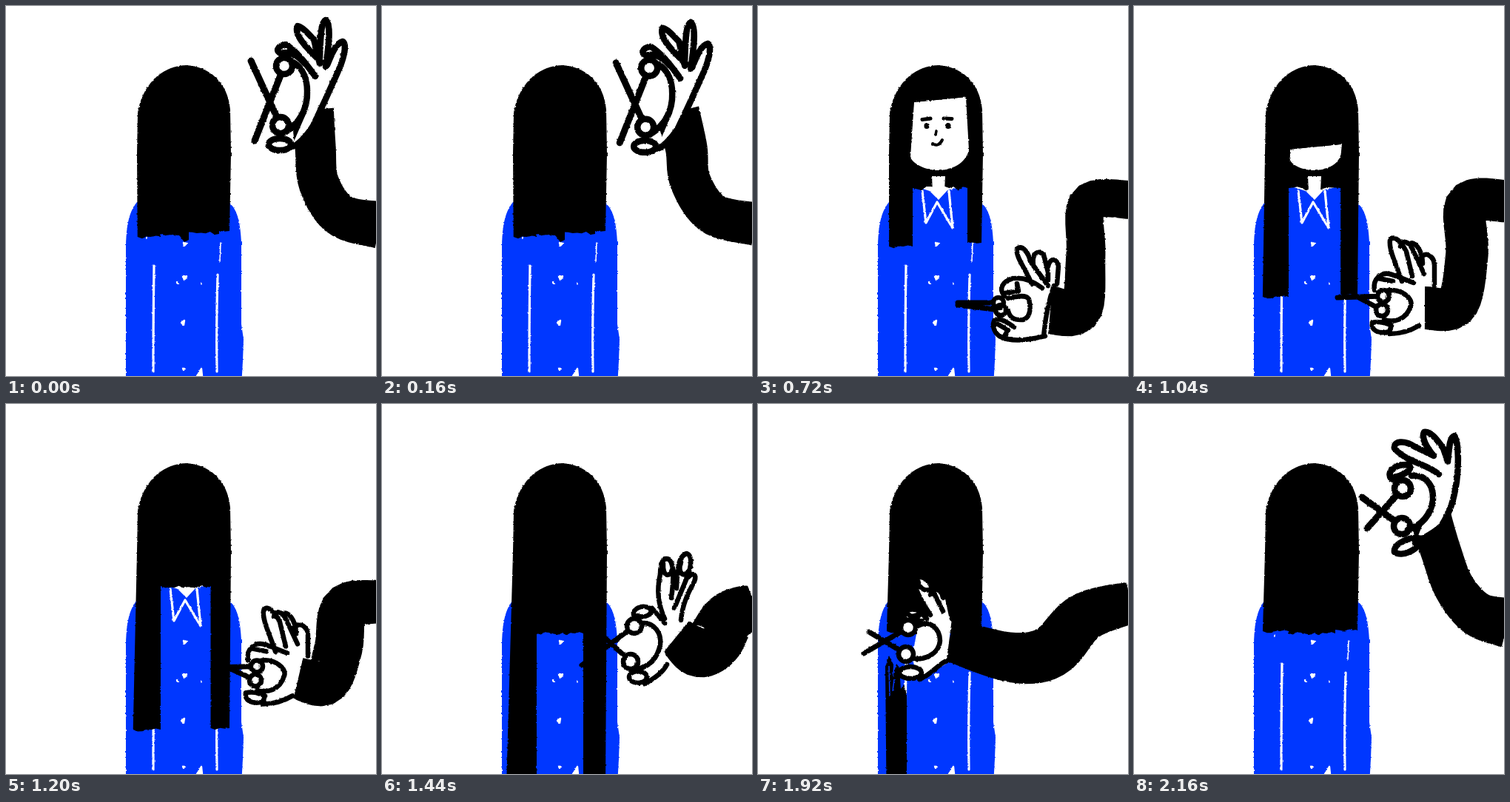
An HTML page for the animation above (2.24 s loop, 500 px wide and 500 px high).

```html
<!DOCTYPE html>
<html lang="en">
<head>
<meta charset="utf-8">
<title>Haircut</title>
<style>
html, body { margin: 0; width: 100%; height: 100%; overflow: hidden; background: #fff; }
svg { display: block; width: 100vw; height: 100vh; }
.pen { stroke-linecap: round; stroke-linejoin: round; }
</style>
</head>
<body>
<svg viewBox="0 0 500 500">
  <defs>
    <filter id="rough" filterUnits="userSpaceOnUse" x="-20" y="-20" width="540" height="540" color-interpolation-filters="sRGB">
      <feTurbulence type="fractalNoise" baseFrequency="0.3" numOctaves="2" seed="4"/>
      <feDisplacementMap in="SourceGraphic" scale="2.5" xChannelSelector="R" yChannelSelector="G"/>
    </filter>
  </defs>
  <g filter="url(#rough)">
    <path fill="#0037ff" d="M177 265C165 280 162 300 162 335V515H318L320 480 321 450 318 430V320C317 295 313 277 304 268L280 243 256 249 244 262 232 250 210 243Z"/>
    <g class="pen" fill="none" stroke="#fff" stroke-width="3.2">
      <path d="M200 351Q199 420 199 494M286 363Q284 430 285 494M222 250L227 293 242 265 263 300 258 250"/>
      <path stroke-width="1.6" d="M290 320L289 345M190 312V314M264 374V376"/>
      <path fill="#fff" stroke-width="2.4" d="M240 320L244 321 241 324ZM239 365L244 366 241 370ZM237 428L241 425 240 431ZM239 490L241 490 240 492ZM231 373L233 375ZM258 500L264 490 265 500Z"/>
    </g>
    <g id="hair"></g>
    <g id="hand" class="pen"></g>
  </g>
</svg>
<script>
const STEP = 80, COUNT = 28;
const hairBox = document.getElementById('hair');
const handBox = document.getElementById('hand');

// arm: middle line from shoulder to wrist; wide: shoulder, wrist, bulge
// blades: tip and ring centre of each; ring: radius; w: line weight
const poses = [
  { w: 8.5, ring: 11, wide: [64, 58, -6],
    arm: [[505, 296], [452, 283], [423, 240], [418, 190], [414, 140]],
    blades: [[[336, 182], [376, 81]], [[331, 74], [371, 161]]],
    hand: 'M355 187a15 8 0 1 0 30 0a15 8 0 1 0 -30 0M418 95C410 85 395 62 378 52C366 54 364 62 372 64C385 60 397 70 404 78M425 75C410 60 388 40 394 27C402 28 412 42 416 45L424 78M424 70C425 45 425 22 432 19C440 25 436 55 432 82M434 80C440 65 446 50 455 48C462 52 455 75 448 90L430 130 415 162C405 178 392 190 386 190M388 76C402 84 407 100 407 115C408 140 395 160 378 170' },
  { w: 7.5, ring: 7, wide: [50, 62, 0],
    arm: [[505, 293], [440, 278], [407, 232], [401, 194], [377, 147]],
    blades: [[[270, 130], [304, 118]], [[270, 122], [308, 138]]],
    hand: 'M351 82L346 60C336 46 332 30 338 24C348 18 360 24 361 42L370 85M340 25C342 40 350 50 357 42M366 68L362 32C368 26 380 24 385 36L392 55 389 92M374 36L377 60 382 62M391 67L404 65 401 120M305 107C301 100 301 92 306 88L350 85C370 85 380 93 386 104M304 96L326 94 324 102M303 109L340 108C356 108 357 118 354 130C348 146 330 150 308 150M304 172L358 175C372 155 388 145 400 128M304 155C318 158 328 165 325 168L305 170' },
  { w: 6.5, ring: 7, wide: [52, 66, -6],
    arm: [[505, 262], [446, 266], [443, 335], [436, 410], [395, 411]],
    blades: [[[270, 401], [325, 401]], [[270, 404], [328, 411]]],
    hand: 'M333 392C325 382 330 372 345 368C360 366 372 372 384 381M334 388L352 385 350 375M370 376C362 355 348 340 350 328C358 322 366 335 368 345L392 378M372 350C370 335 378 328 386 336L392 360V370M392 352C395 338 405 342 406 352L404 376M338 395C350 392 362 390 366 396C370 412 366 422 358 424C345 425 340 420 338 412M320 424C316 430 318 440 326 446C345 456 370 450 388 446M324 430L338 438 333 446M320 424C328 421 338 428 346 434M400 378C392 400 388 425 386 446' },
  { w: 6.5, ring: 8, wide: [57, 58, 0],
    arm: [[505, 264], [450, 267], [450, 335], [436, 404], [393, 408]],
    blades: [[[275, 394], [337, 392]], [[300, 392], [335, 411]]],
    hand: 'M362 372C355 350 344 330 346 316C352 308 362 320 368 332L376 365M360 325C364 312 374 322 378 332L392 362M372 322C378 315 390 330 390 348M388 340C395 330 406 340 406 350V378M325 384C322 368 335 360 345 362C360 366 370 372 378 374M330 368L350 372M340 385C360 380 378 395 374 405C368 425 350 428 338 424M322 428C320 438 330 444 345 440L348 432C340 428 330 426 322 428M345 443C360 443 375 438 385 432' },
  { w: 6.5, ring: 10, wide: [57, 52, 22],
    arm: [[505, 272], [470, 288], [448, 322], [425, 334], [398, 314]],
    blades: [[[270, 353], [341, 300]], [[300, 315], [336, 348]]],
    hand: 'M334 369a12 8 0 1 0 24 0a12 8 0 1 0 -24 0M382 290C375 275 370 255 376 230C376 215 380 206 388 210C396 218 394 240 391 262M380 216C379 232 388 236 392 224M398 249C399 225 400 205 412 202C420 205 418 220 412 235L395 276M404 214C399 228 408 236 414 226M414 234C420 227 426 230 422 240C412 258 406 272 404 292M340 285C338 278 350 270 362 276C368 284 355 290 345 286M365 276L382 296M352 296C368 295 378 310 376 325C372 345 360 355 345 358M355 378C370 370 380 362 385 352' },
  { w: 6.5, ring: 10, wide: [55, 56, 16],
    arm: [[505, 268], [470, 288], [445, 335], [415, 342], [370, 318]],
    blades: [[[255, 337], [315, 302]], [[262, 308], [312, 338]]],
    palm: 'M326 235L348 250 368 262 374 290 367 346 330 372 320 344C345 346 358 335 358 320C358 305 345 290 328 300L345 285Z',
    hand: 'M303 363a15 8 0 1 0 30 0a15 8 0 1 0 -30 0M345 285C332 265 320 245 326 235C335 230 345 240 348 252L362 280M328 238C330 250 338 254 346 250M345 258C350 245 360 250 362 262M356 252C362 244 366 250 368 262L374 290M310 290C308 280 318 274 330 280L340 290M316 285C324 292 332 288 330 281M328 300C345 290 358 305 358 320C356 340 335 346 320 344M330 372C350 365 358 345 375 346' },
  { w: 8.5, ring: 11, wide: [68, 56, -6],
    arm: [[505, 296], [464, 284], [433, 248], [415, 200], [402, 158]],
    blades: [[[315, 168], [363, 114]], [[308, 126], [362, 165]]],
    hand: 'M412 95C395 80 370 80 352 60C350 50 365 48 380 58L405 70M405 70C395 58 388 45 392 38C402 36 412 52 418 60L424 78M424 78C426 60 426 45 433 43C440 55 438 90 436 105C432 130 428 145 415 165C405 175 392 180 380 188M348 102C340 92 352 82 368 82C380 84 370 95 352 99M375 97C395 95 405 110 404 130C400 155 385 165 370 170M352 200C350 188 375 178 388 182C385 198 362 207 352 200Z' }
];

// when the hand reaches each pose, with an optional shift
const moves = [
  { at: 0, pose: 0 }, { at: 5, pose: 1 }, { at: 7, pose: 1, dx: 15, dy: 40 },
  { at: 9, pose: 2 }, { at: 13, pose: 3 }, { at: 18, pose: 4 }, { at: 21, pose: 5 },
  { at: 24, pose: 5, dx: -112 }, { at: 27, pose: 6 }, { at: 28, pose: 0 }
];

// steps at which hair is cut
const FACE_CUT = 4, FALLEN = 7, GROW = 9, GROWN = 18, RIGHT_CUT = 20, LEFT_CUT = 24;

const curtain = 'M205 125L222 130 233 142 244 165 250 195 253 222 268 240 270 246 290 250 290 304 281 302 276 430 270 430 267 408 262 410 258 395 254 416 249 418 246 386 240 388 234 374 231 398 226 400 222 360 220 340 212 330 204 318 196 312 200 240Z';
const lock = 'M276 640L274 425 279 410 285 422 284 440 289 421 293 426 295 455 299 449 303 462V640Z';

const mix = (a, b, t) => a + (b - a) * t;
const mixPoint = (a, b, t) => a.map((v, i) => mix(v, b[i], t));
const path = (d, attrs = '') => `<path d="${d}" ${attrs}/>`;
const pen = (d, w, color = '#000', fill = 'none') =>
  path(d, `fill="${fill}" stroke="${color}" stroke-width="${w}"`);
const moved = (x, y, body) => `<g transform="translate(${x} ${y})">${body}</g>`;
const circle = ([x, y], r) => `M${x - r} ${y}a${r} ${r} 0 1 0 ${2 * r} 0a${r} ${r} 0 1 0 ${-2 * r} 0Z`;

// ragged cut from x1 to x2
function ragged(x1, x2, y, size) {
  const n = Math.max(2, Math.round(Math.abs(x2 - x1) / 6));
  let d = `L${x1} ${y}`;
  for (let i = 1; i < n; i++) {
    const r = Math.sin(i * 12.9 + Math.round(x1)) * 43758.5;
    d += `L${mix(x1, x2, i / n)} ${y + (r - Math.floor(r) - 0.4) * size}`;
  }
  return d + `L${x2} ${y}`;
}

function face(fringe, grow) {
  const slim = 14 * grow, side = Math.max(195, fringe);
  return path('M235 230H253L252 250Q244 262 236 252Z', 'fill="#fff"') +
    path(`M211 ${fringe + 3}L281 ${fringe - 4}L${285 - slim} ${side}C280 213 262 222 243 222C225 222 208 212 ${206 + slim} ${side + 9}Z`, 'fill="#fff"') +
    '<g class="pen">' + pen('M222 153.500L233 152M251 152L262 152.500', 5) +
    pen('M228 161.500V162.500M257 161.500V162.500', 7) + pen('M241 169L240 174', 3.500) +
    (fringe < 180 ? pen('M236 186Q244 191 249 181', 4) : '') + '</g>' +
    path(`M200 115H288L282 ${fringe - 4} 210 ${fringe + 3}Z`);
}

function drawHair(step) {
  const grow = Math.min(1, Math.max(0, (step - GROW) / (GROWN - GROW))) ** 1.3;
  const bob = step < FALLEN;
  const left = bob ? 312 : step < LEFT_CUT ? mix(325, 520, grow) : 307;
  const right = bob ? 304 : step < RIGHT_CUT ? mix(320, 520, grow) : 305;
  const fringe = step < FACE_CUT ? 308 : mix(127, 310, grow);
  const outer = 178 - (left - 306) * 0.047 - (step < LEFT_CUT ? 0 : 4);
  const inner = bob ? 288 : 283 - 11 * grow;
  const back = Math.max(246, fringe);

  let out = path(`M${outer} ${left}L177 200L178 145C183 110 208 81 243 80C273 81 300 102 303 140L304 200` +
    ragged(302, inner, right, 4) + ragged(inner, 209, back, bob ? 10 : 6) +
    ragged(209, outer, left, 4) + 'Z');
  if (step < FACE_CUT) out += path('M222 295L247 300V316L241 319 234 310Z');
  if (fringe < 215) out += face(fringe, grow);
  if (step >= FACE_CUT && step <= FALLEN) {
    out += moved(0, 118 * Math.max(-0.2, step - 5), path(curtain));
    if (step === 5) out += path('M243 234L248 230 246 240 244 252Z', 'fill="#fff"');
  }
  for (const [cut, x] of [[RIGHT_CUT, 0], [LEFT_CUT, -102]]) {
    const n = step - cut;
    if (n >= 0 && n < 3)
      out += moved(x, 70 * (n - 1), path(lock) + pen('M279 424L280 465M286 442L284 458', 1.500, '#0037ff'));
  }
  hairBox.innerHTML = out;
}

// middle line of an arm, shifted less and less towards the shoulder
const armOf = ({ pose, dx = 0, dy = 0 }) => poses[pose].arm.map(([x, y]) => {
  const k = Math.min(1, (505 - x) / 135);
  return [x + dx * k, y + dy * k];
});

// point on a smooth curve through p, u from 0 to 1
function along(p, u) {
  const s = u * (p.length - 1), i = Math.min(p.length - 2, Math.floor(s)), t = s - i;
  const b = p[i], c = p[i + 1], a = p[i - 1] || b, e = p[i + 2] || c;
  return b.map((v, k) => v + t / 2 * (c[k] - a[k] + t *
    (2 * a[k] - 5 * v + 4 * c[k] - e[k] + t * (3 * (v - c[k]) + e[k] - a[k]))));
}

function armShape(line, [shoulder, wrist, bulge]) {
  const n = 30, top = [], low = [];
  for (let i = 0; i <= n; i++) {
    const u = i / n, [x, y] = along(line, u);
    const [x1, y1] = along(line, Math.max(0, u - 0.02)), [x2, y2] = along(line, Math.min(1, u + 0.02));
    const half = (mix(shoulder, wrist, u) + bulge * Math.sin(Math.PI * u)) / 2;
    const k = half / Math.hypot(x2 - x1, y2 - y1);
    top.push([x - (y2 - y1) * k, y + (x2 - x1) * k]);
    low.unshift([x + (y2 - y1) * k, y - (x2 - x1) * k]);
  }
  return `M${top.concat(low).join('L')}Z`;
}

function drawHand(step) {
  const i = moves.findIndex(m => m.at > step);
  const a = moves[i - 1], b = moves[i], t = (step - a.at) / (b.at - a.at);
  const to = armOf(b), arm = armOf(a).map((p, k) => mixPoint(p, to[k], t));
  const wide = mixPoint(poses[a.pose].wide, poses[b.pose].wide, t);
  const pose = poses[(t < 0.5 ? a : b).pose];
  const now = arm[4], home = pose.arm[4];

  // blades close on odd steps between poses
  const snip = t > 0 && step % 2 ? 0.4 : 0;
  const [p, q] = pose.blades, middle = mixPoint(p[0], q[0], 0.5);
  const blades = pose.blades.map(([tip, ring]) => `M${mixPoint(tip, middle, snip)}L${ring}`).join('');
  const rings = pose.blades.map(([, ring]) => circle(ring, pose.ring)).join('');

  handBox.innerHTML = path(armShape(arm, wide)) +
    moved(now[0] - home[0], now[1] - home[1],
      (pose.palm ? path(pose.palm, 'fill="#fff"') : '') +
      pen(blades, pose.w + 0.5) + pen(pose.hand + rings, pose.w, '#000', '#fff'));
}

const start = performance.now();
let shown = -1;
function tick() {
  const step = Math.floor((performance.now() - start) / STEP) % COUNT;
  if (step !== shown) {
    shown = step;
    drawHair(step);
    drawHand(step);
  }
  requestAnimationFrame(tick);
}
tick();
</script>
</body>
</html>
```
